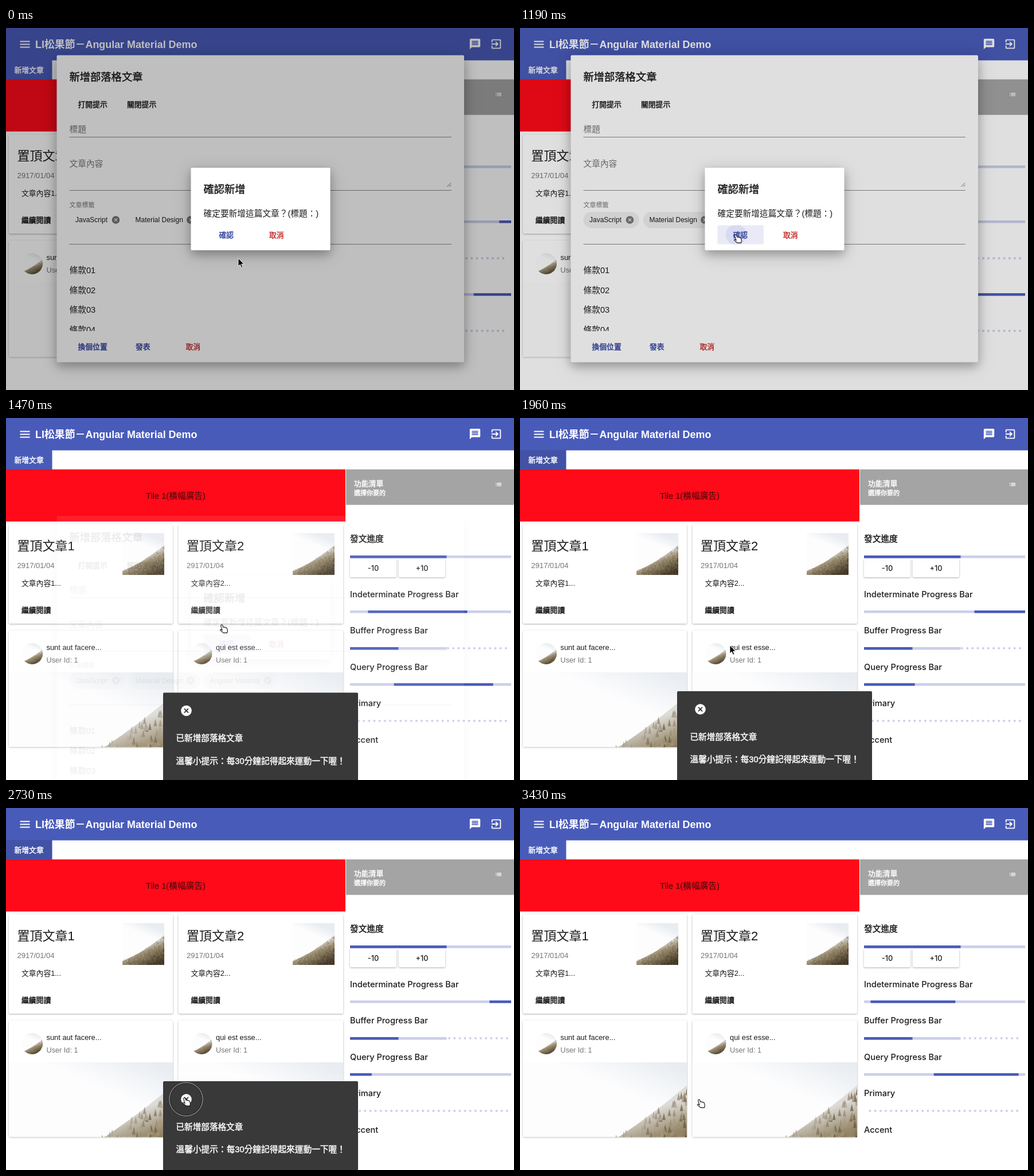
An HTML page that plays this animation: 886 px wide and 632 px high, repeating every 3.5 s.

```html
<!DOCTYPE html>
<html lang="zh-TW">
<head>
<meta charset="utf-8">
<title>Angular Material Demo</title>
<style>
html, body { margin: 0; width: 100%; height: 100%; overflow: hidden; background: #fff; }
svg text { font-family: "Liberation Sans", "Noto Sans CJK TC", "Noto Sans CJK JP", sans-serif; white-space: pre; }
svg text.ui { font-family: Inter, "Noto Sans CJK TC", sans-serif; }
#stage { display: block; width: 100vw; height: 100vh; }
.card { fill: #fff; filter: drop-shadow(0 1px 1.5px rgba(0,0,0,.32)); }
.modal { fill: #fff; filter: drop-shadow(0 7px 8px rgba(0,0,0,.2)) drop-shadow(0 6px 14px rgba(0,0,0,.2)); }
</style>
</head>
<body>
<svg id="stage" viewBox="0 0 886 632" preserveAspectRatio="none"></svg>
<script>
const BLUE = '#495bb9', PALE = '#cbcfea', INK = '#1b1b1b', GREY = '#767676',
      LINK = '#3242a0', WARN = '#c4302f', LOOP = 3500, STEP = 70, DOT = 9.17;

// ---- markup helpers ----
const rect = (x, y, w, h, fill, more = '') =>
  `<rect x="${x}" y="${y}" width="${w}" height="${h}" fill="${fill}" ${more}/>`;
const text = (x, mid, size, s, fill = INK, weight = 400, more = '') =>
  `<text x="${x}" y="${mid + size * .37}" font-size="${size}" fill="${fill}" font-weight="${weight}" ${more}>${s}</text>`;
// medium weight: regular glyphs thickened by a hairline outline
const medium = (x, mid, size, s, fill = INK) =>
  text(x, mid, size, s, fill, 400, `stroke="${fill}" stroke-width=".45"`);
const icon = (x, y, k, d, fill = '#fff') =>
  `<path transform="translate(${x} ${y}) scale(${k})" fill="${fill}" d="${d}"/>`;
const line = (y, color = '#8a8a8a') => rect(110.5, y, 666.5, 1, color);
const cross = (x, y, r, fill, stroke) => {
  const a = r * .38;
  return `<circle cx="${x}" cy="${y}" r="${r}" fill="${fill}"/><path d="M${x - a} ${y - a}l${2 * a} ${2 * a}m0 ${-2 * a}l${-2 * a} ${2 * a}" stroke="${stroke}" stroke-width="${r * .2}"/>`;
};

// ---- hillside picture ----
let seed = 77;
const rnd = () => (seed = seed * 16807 % 2147483647) / 2147483647;
const ridge = x => 28 + .85 * (100 - x) - .0022 * (100 - x) ** 2;

function hillside() {
  let hill = 'M0 100', trees = '';
  for (let x = 0; x <= 100; x += 10) hill += `L${x} ${ridge(x)}`;
  for (let i = 0; i < 380; i++) {
    const x = 100 - 100 * rnd() ** 1.4, d = rnd(), y = ridge(x) + d * (102 - ridge(x));
    const depth = Math.min(1, (y - ridge(x)) / 45);
    trees += `<path d="M${x} ${y - 2.6}l1 4.4h-2z" fill="hsl(${32 + rnd() * 12} ${12 + depth * 18}% ${62 - depth * 38 + (rnd() - .5) * 24}%)"/>`;
  }
  return rect(0, 0, 100, 100, 'url(#sky)') + `<path d="${hill}V100Z" fill="url(#earth)"/>` + trees;
}
const picture = (x, y, w, h, box = '0 0 100 100', more = '') =>
  `<svg x="${x}" y="${y}" width="${w}" height="${h}" viewBox="${box}" preserveAspectRatio="none"><use href="#photo" ${more}/></svg>`;

const defs = `<defs>
  <linearGradient id="sky" x1=".7" y1="0" x2=".45" y2=".6"><stop offset=".1" stop-color="#e9edf1"/><stop offset=".5" stop-color="#fdfdfe"/></linearGradient>
  <linearGradient id="earth" x1=".42" y1=".36" x2=".75" y2="1"><stop offset=".05" stop-color="#dedcd8"/><stop offset=".35" stop-color="#978a6c"/><stop offset="1" stop-color="#453a2b"/></linearGradient>
  <g id="photo">${hillside()}</g>
  <clipPath id="terms"><rect x="89" y="400" width="700" height="129"/></clipPath>
  <clipPath id="okClip"><rect x="344.5" y="344.5" width="80.5" height="33" rx="2"/></clipPath>
  <clipPath id="face"><circle cx="50" cy="50" r="50"/></clipPath>
</defs>`;

// ---- page ----
const header = rect(0, 0, 886, 56.5, BLUE) + rect(0, 56, 80.5, 34, BLUE, 'id="tab"') +
  [22.5, 27.5, 32.5].map(y => rect(24.5, y, 17, 2, '#fff')).join('') +
  text(51, 28.5, 17.9, 'LI松果節－Angular Material Demo', '#fff', 700) +
  icon(807, 17, .917, 'M20 2H4c-1.1 0-2 .9-2 2v18l4-4h14c1.1 0 2-.9 2-2V4c0-1.1-.9-2-2-2zm-2 12H6v-2h12v2zm0-3H6V9h12v2zm0-3H6V6h12v2z') +
  icon(844, 17, .917, 'M10.1 15.6L11.5 17l5-5-5-5-1.4 1.4L12.7 11H3v2h9.7zM19 3H5c-1.1 0-2 .9-2 2v4h2V5h14v14H5v-4H3v4c0 1.1.9 2 2 2h14c1.1 0 2-.9 2-2V5c0-1.1-.9-2-2-2z') +
  medium(14.5, 73, 12.8, '新增文章', '#fff');

const pinned = (x, w, n) => rect(x, 186, w, 173, '#fff', 'class="card" rx="2"') +
  text(x + 14.5, 223, 22, '置頂文章' + n) + text(x + 14.5, 257, 13, '2917/01/04', GREY) +
  text(x + 22, 288, 12.8, `文章內容${n}...`) + medium(x + 22, 335, 12.8, '繼續閱讀') +
  picture(x + (n < 2 ? 198 : 199.5), 201, 73, 73);

const post = (x, w, title) => rect(x, 371, w, 203, '#fff', 'class="card" rx="2"') +
  picture(x + 22, 393, 37, 37, '0 0 100 100', 'clip-path="url(#face)"') +
  text(x + 65.5, 400, 12.9, title) + text(x + 65.5, 422, 12.7, 'User Id: 1', GREY) +
  picture(x, 444, w, 130.5, '0 14 100 45.5');

const bar = (y, id) => `<svg x="600" y="${y}" width="281" height="4.6">${rect(0, 0, 281, 5, PALE)}` +
  rect(0, 0, 0, 5, BLUE, `id="${id}0"`) + rect(0, 0, 0, 5, BLUE, `id="${id}1"`) + '</svg>';
const dots = (x, y) => `<path class="dots" d="M${x} ${y}H875" stroke="${PALE}" stroke-width="4" stroke-linecap="round" stroke-dasharray="0 ${DOT}"/>`;
const label = (y, s) => text(600, y, 14.55, s, INK, 500, 'class="ui"');
const raised = (x, s) => rect(x, 246, 81, 32, '#fff', 'class="card" rx="2"') +
  text(x + 40.5, 262, 12.8, s, INK, 500, 'class="ui" text-anchor="middle"');

const page = rect(0, 0, 886, 632, '#fff') + header +
  rect(0, 89.7, 592, 91, '#ff0a19') + text(244, 136, 14.7, 'Tile 1(橫幅廣告)', '#3d0808') +
  pinned(5, 286, 1) + pinned(300.5, 287.5, 2) +
  post(5, 286, 'sunt aut facere...') + post(300.5, 287.5, 'qui est esse...') +
  rect(593, 89.7, 293, 62, '#a4a4a4') + medium(607, 114, 12.8, '功能清單', '#fff') +
  medium(607, 131, 11, '選擇你要的', '#fff') +
  icon(852.5, 109.5, .55, 'M3 13h2v-2H3zm0 4h2v-2H3zm0-8h2V7H3zm4 4h14v-2H7zm0 4h14v-2H7zM7 7v2h14V7z') +
  medium(600, 211, 14.7, '發文進度') +
  rect(600, 240, 281, 4.6, PALE) + rect(600, 240, 168.5, 4.6, BLUE) + raised(600, '-10') + raised(685, '+10') +
  label(307.5, 'Indeterminate Progress Bar') + bar(336, 'run') +
  label(370.5, 'Buffer Progress Bar') + dots(770, 402) + rect(600, 400, 168.5, 4.6, PALE) + rect(600, 400, 84.5, 4.6, BLUE) +
  label(434.5, 'Query Progress Bar') + bar(463, 'ask') +
  label(497.5, 'Primary') + dots(604.9, 528.7) + label(561.5, 'Accent');

// ---- overlays ----
const chip = (x, w, s) => rect(x, 321, w, 28.5, '#e0e0e0', 'class="chip" rx="14.2"') +
  text(x + 10.5, 335, 12, s) + cross(x + w - 16, 335, 6.8, '#777', '#e4e4e4');

const dialog = `<g id="dialog">` + rect(88.5, 47.5, 710.5, 536, '#fff', 'class="modal" rx="2"') +
  medium(110.5, 85, 18.3, '新增部落格文章') +
  medium(125.5, 133.5, 12.8, '打開提示') + medium(211, 133.5, 12.8, '關閉提示') +
  text(110.5, 176.5, 14.7, '標題', GREY) + line(190) +
  text(110.5, 237, 14.7, '文章內容', GREY) + line(283) +
  '<path d="M769.5 277l6.5-6.5M773.5 277l3-3" stroke="#666" stroke-width="1"/>' +
  text(110.5, 308.5, 11, '文章標籤', GREY) +
  chip(110.5, 97, 'JavaScript') + chip(215, 123, 'Material Design') + chip(345, 127, 'Angular Material') + line(377) +
  '<g clip-path="url(#terms)">' + [1, 2, 3, 4].map(n => text(110.5, 387.7 + n * 34.7, 14.7, '條款0' + n)).join('') + '</g>' +
  medium(125.5, 556.5, 12.8, '換個位置', LINK) + medium(226, 556.5, 12.8, '發表', LINK) +
  medium(313.5, 556.5, 12.8, '取消', WARN) + '</g>';

const confirmBox = `<g id="confirm">` + rect(322.5, 244, 243, 144, '#fff', 'class="modal" rx="2"') +
  medium(344.5, 281.5, 18.3, '確認新增') + text(344.5, 323.5, 14.7, '確定要新增這篇文章？(標題：)') +
  rect(344.5, 344.5, 80.5, 33, '#e9eaf6', 'id="hover" rx="2"') +
  '<g clip-path="url(#okClip)"><circle id="ripple" cx="377" cy="361" fill="#3f51b5" fill-opacity=".1"/></g>' +
  medium(371.5, 361, 12.8, '確認', LINK) + medium(459, 361, 12.8, '取消', WARN) + '</g>';

const snack = `<g id="snack">` + rect(274, 477, 340, 160, '#393939', 'rx="2"') +
  '<g id="ring" fill="none"><circle cx="314" cy="508.5" r="29" stroke="#b5b5b5"/><circle cx="314" cy="508.5" r="27.8" stroke="#1d1d1d"/></g>' +
  cross(314.5, 508.5, 9.3, '#fff', '#393939') +
  medium(296.5, 556.5, 14.6, '已新增部落格文章', '#fff') +
  medium(296.5, 596, 14.7, '溫馨小提示：每30分鐘記得起來運動一下喔！', '#fff') + '</g>';

const pointer = `<g id="pointer">
  <path id="arrow" d="M0 0V14L3.3 11 5.6 16.4 7.9 15.4 5.6 10.2H10Z" fill="#000" stroke="#fff" stroke-width=".9"/>
  <path id="hand" transform="translate(-4 0)" d="M2 1.5c.8-1.2 2-.8 2.5.3l1.3 3.4c.8-.7 1.8-.4 2.2.3.8-.6 1.8-.3 2.1.5.9-.4 1.9.1 2.2 1.1l1 3.6c.3 1.5-.2 3-.8 4.4H6.2L1 10.9c-1-1-.2-2.3 1.1-1.7L4 10.4 1.8 3.4c-.3-.8-.2-1.4.2-1.9z" fill="#fff" stroke="#111" stroke-width="1.1"/></g>`;

const stage = document.getElementById('stage');
stage.innerHTML = defs + page + dialog + rect(0, 0, 886, 632, '#000', 'id="dim"') + confirmBox + snack + pointer;

// ---- motion ----
const clamp = v => Math.min(1, Math.max(0, v));
const cubic = (a, b, s) => 3 * (1 - s) ** 2 * s * a + 3 * (1 - s) * s * s * b + s ** 3;
function bezier(x, [a, b, c, d]) {
  let lo = 0, hi = 1;
  for (let i = 0; i < 24; i++) {
    const m = (lo + hi) / 2;
    if (cubic(a, c, m) < x) lo = m; else hi = m;
  }
  return x <= 0 ? 0 : x >= 1 ? 1 : cubic(b, d, lo);
}
// keys: [time, value, optional easing to the next key]
function track(keys, t) {
  let i = keys.length - 1;
  while (i && keys[i][0] > t) i--;
  const [t0, v0, ease] = keys[i], next = keys[i + 1];
  if (!next) return v0;
  const p = (t - t0) / (next[0] - t0);
  return v0 + (next[1] - v0) * (ease ? bezier(p, ease) : p);
}

const SLIDES = [
  { left: -145.167,
    move: [[0, 0], [20, 0, [.5, 0, .7017, .4958]], [59.15, 83.671, [.3024, .3814, .55, .9564]], [100, 200.611]],
    size: [[0, .08], [36.65, .08, [.3347, .1248, .7858, 1]], [69.15, .6615, [.06, .11, .6, 1]], [100, .08]] },
  { left: -54.889,
    move: [[0, 0, [.15, 0, .5151, .4097]], [25, 37.652, [.3103, .2841, .8, .7337]], [48.35, 84.386, [.4, .627, .6, .902]], [100, 160.278]],
    size: [[0, .08, [.205, .0571, .5766, .454]], [19.15, .4571, [.1523, .1964, .6484, 1.0043]], [44.15, .728, [.2578, -.0032, .2118, 1.3818]], [100, .08]] }
];
const CLOCK = [[0, 1222], [770, 1990], [1260, 2400], [1470, 2600], [1960, 3098], [2730, 3792], [3430, 4474], [3500, 4542]];
const SOFT = [.4, 0, .3, 1];
const MOUSE_X = [[0, 405], [140, 405, SOFT], [700, 377], [1540, 377, SOFT], [1960, 366], [2030, 366, SOFT], [2660, 312], [2800, 312], [3430, 313]];
const MOUSE_Y = [[0, 402], [140, 402, SOFT], [700, 360], [1540, 360, SOFT], [1960, 397], [2030, 397, SOFT], [2660, 505], [2800, 505], [3430, 508]];

const el = id => document.getElementById(id);
const set = (id, name, v) => el(id).setAttribute(name, v);
const show = (id, on) => set(id, 'visibility', on ? 'visible' : 'hidden');
const within = (t, a, b) => t >= a && t < b;

function draw(t) {
  const clock = track(CLOCK, t), pct = clock % 2000 / 20;
  SLIDES.forEach((s, i) => {
    const w = track(s.size, pct) * 281;
    const x = (s.left + 50 + track(s.move, pct)) * 2.81 - w / 2;
    set('run' + i, 'x', x);
    set('run' + i, 'width', w);
    set('ask' + i, 'x', 281 - x - w);
    set('ask' + i, 'width', w);
  });
  for (const d of document.querySelectorAll('.dots'))
    d.setAttribute('stroke-dashoffset', (clock / 250 - .5) % 1 * DOT);

  const lit = clamp((t - 1120) / 140);
  set('dim', 'opacity', .25 * (1 - lit));
  for (const c of document.querySelectorAll('.chip')) c.setAttribute('opacity', lit);

  const out = bezier((t - 1283) / 400, [.25, .8, .25, 1]);
  for (const [id, h] of [['dialog', 536], ['confirm', 144]]) {
    set(id, 'transform', `translate(0 ${h * .25 * out})`);
    set(id, 'opacity', 1 - out);
  }
  show('hover', t >= 490);
  set('ripple', 'r', 50 * clamp((t - 1120) / 195));

  const rise = bezier((t - 1283) / 225, [0, 0, .2, 1]), fall = bezier((t - 3010) / 195, [.4, 0, 1, 1]);
  set('snack', 'transform', `translate(0 ${155 * (1 - rise + fall)})`);
  show('snack', within(t, 1283, 3205));
  show('ring', within(t, 2600, 3205));
  set('tab', 'fill', within(t, 1680, 2940) ? '#4252a6' : BLUE);

  const hand = within(t, 840, 1680) || t >= 2590;
  set('pointer', 'transform', `translate(${track(MOUSE_X, t)} ${track(MOUSE_Y, t)})`);
  show('hand', hand);
  show('arrow', !hand);
}

const start = performance.now();
let shown = -1;
function tick() {
  const step = Math.floor((performance.now() - start) % LOOP / STEP);
  if (step !== shown) draw((shown = step) * STEP);
  requestAnimationFrame(tick);
}
tick();
</script>
</body>
</html>
```
